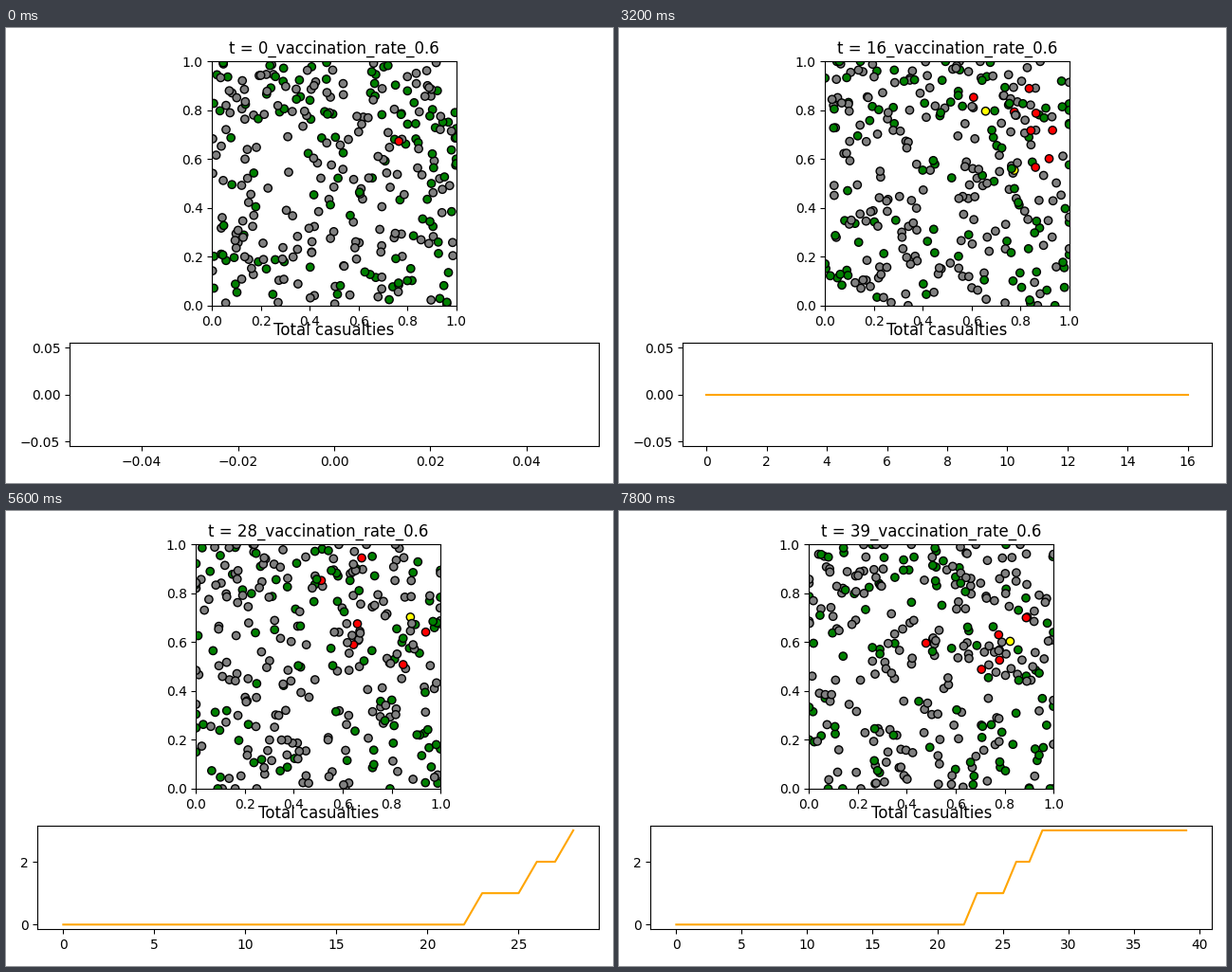
A matplotlib script for the animation above (8000 ms loop, 640 by 480 pixels).

```python
import numpy as np
import matplotlib.pyplot as plt
from matplotlib.animation import FuncAnimation

STEPS = 40
PEOPLE = 300
RATE = 0.6
STRIDE = 0.05
INCUBATION, ILLNESS = 5, 13
TOP = 1 - 35.33 / 480

# The outbreak: step at which each case begins, and where they gather.
ONSETS = [-5, 3, 3, 4, *range(7, 15), 17, 18, 22, 22, *range(28, 33), 36]
FOCUS, SPREAD = (0.79, 0.70), (0.06, 0.08)
PATIENT_ZERO = (0.765, 0.673)
DEATHS = {4: 23, 12: 26, 14: 28}
FIRST = 200


def random_walk(rng):
    path = np.empty((STEPS, PEOPLE, 2))
    path[0] = rng.random((PEOPLE, 2))
    for t in range(1, STEPS):
        step = rng.uniform(-STRIDE, STRIDE, (PEOPLE, 2))
        path[t] = np.clip(path[t - 1] + step, 0, 1)
    return path


def gather(path, rng):
    """Shift the walk of each case so that it falls ill near the focus."""
    spots = rng.normal(FOCUS, SPREAD, (len(ONSETS), 2))
    spots[0] = PATIENT_ZERO
    for who, (onset, spot) in enumerate(zip(ONSETS, spots), FIRST):
        path[:, who] += spot - path[max(onset, 0), who]
    return np.clip(path, 0, 1)


def case_color(age):
    if age < 0:
        return "green"
    if age < INCUBATION:
        return "yellow"
    return "red" if age < INCUBATION + ILLNESS else "gray"


rng = np.random.default_rng(12)
path = gather(random_walk(rng), rng)

crowd = np.setdiff1d(np.arange(PEOPLE), FIRST + np.arange(len(ONSETS)))
vaccinated = set(rng.choice(crowd, int(PEOPLE * RATE), replace=False).tolist())
base = ["gray" if i in vaccinated else "green" for i in range(PEOPLE)]
toll = [sum(t >= day for day in DEATHS.values()) for t in range(STEPS)]

fig = plt.figure(figsize=(6.4, 4.8), dpi=100)
grid = fig.add_gridspec(3, 1)
field = fig.add_subplot(grid[:2])
chart = fig.add_subplot(grid[2])


def update(t):
    field.clear()
    chart.clear()

    colors = base.copy()
    for who, onset in enumerate(ONSETS, FIRST):
        colors[who] = case_color(t - onset)
    alive = [i for i in range(PEOPLE) if DEATHS.get(i - FIRST, STEPS) > t]
    field.scatter(path[t, alive, 0], path[t, alive, 1],
                  c=[colors[i] for i in alive], edgecolors="black")
    field.set(xlim=(0, 1), ylim=(0, 1), aspect="equal",
              title=f"t = {t}_vaccination_rate_{RATE}")

    chart.plot(range(t + 1), toll[:t + 1], color="orange")
    fig.subplots_adjust(.125, .11, .9, .88, .2, .2)
    fig.tight_layout()
    fig.subplots_adjust(top=TOP)
    # The heading is set after the layout, so it takes up no room.
    chart.set_title("Total casualties")


anim = FuncAnimation(fig, update, frames=STEPS, interval=200,
                     init_func=lambda: None, repeat=True, repeat_delay=0)
plt.show()
```
